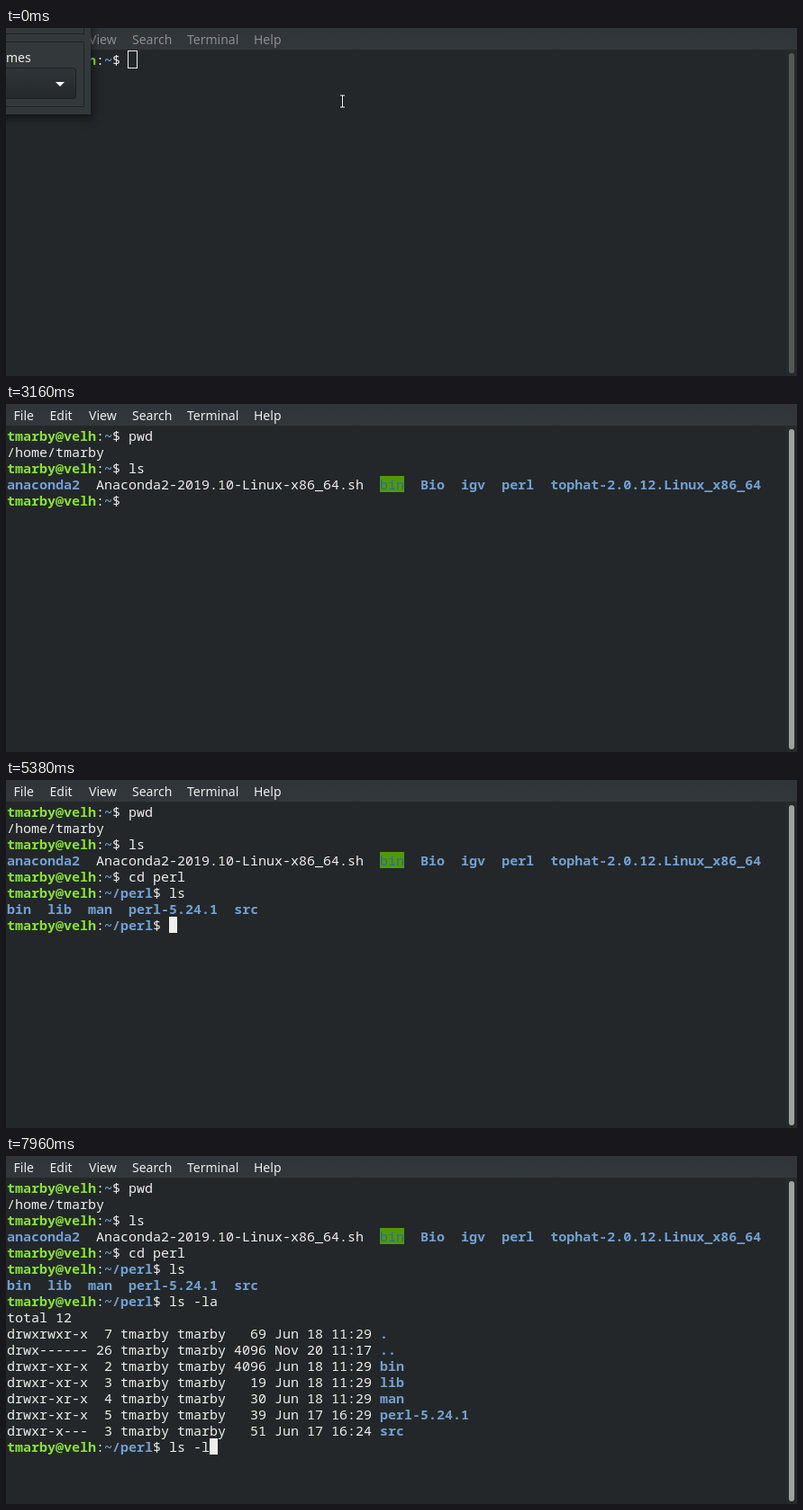
Animation of 878 by 387 pixels, one loop 8 s. Source, as an HTML page:

```html
<!DOCTYPE html>
<html lang="en">
<head>
<meta charset="utf-8">
<title>Terminal</title>
<style>
  html, body { margin: 0; width: 100%; height: 100%; overflow: hidden; background: #232729; }
  #stage { position: relative; width: 878px; height: 387px; overflow: hidden; background: #232729; }
  #stage div, #stage span.item, #stage svg { position: absolute; }
  .ui { font: 500 14px/20px "Noto Sans", "Open Sans", sans-serif; white-space: pre; }
  #menu { left: 0; top: 0; width: 878px; height: 24px; background: linear-gradient(#2f3538, #31373a); border-bottom: 1px solid #24282a; }
  #menu .item { top: 3px; }
  #trough { left: 866px; top: 25px; width: 12px; height: 362px; background: #262a2c; }
  #thumb { left: 869px; top: 28px; width: 6px; height: 356px; border-radius: 3px; }
  #screen { left: 1px; top: 26px; margin: 0; position: absolute; color: #eeeeec;
    font: 500 15px/18px "Noto Sans Mono", "Liberation Mono", monospace; font-variant-ligatures: none; white-space: pre; }
  #screen b { color: #729fcf; }
  #screen b.who { color: #8ae234; }
  #screen i { display: inline-block; height: 18px; vertical-align: top; font-style: normal; color: #3465a4; background: #4e9a06; }
  #cursor { width: 9px; height: 18px; background: #eeeeec; }
  #cursor.hollow { background: none; outline: 1px solid #eeeeec; }
  #dialog { left: -40px; top: -20px; width: 134px; height: 116px; background: #33393b; box-shadow: 0 2px 9px 2px rgba(0, 0, 0, .5); color: #eeeeec; }
  #dialog .frame { left: 0; width: 125px; border: 1px solid #1f2325; }
  #combo { left: 0; top: 64px; width: 116px; height: 33px; border: 1px solid #1c2022; border-radius: 3px; background: linear-gradient(#2f3538, #24292b); }
  #arrow { left: 95px; top: 80px; border: 5px solid transparent; border-top-color: #fff; border-bottom: 0; }
</style>
</head>
<body>
<div id="stage">
  <div id="menu" class="ui">
    <span class="item" style="left:8.5px">File</span>
    <span class="item" style="left:48.5px">Edit</span>
    <span class="item" style="left:92px">View</span>
    <span class="item" style="left:140px">Search</span>
    <span class="item" style="left:201px">Terminal</span>
    <span class="item" style="left:275px">Help</span>
  </div>
  <div id="trough"></div>
  <div id="thumb"></div>
  <pre id="screen"></pre>
  <div id="cursor"></div>
  <div id="dialog">
    <div class="frame" style="top:0;height:25px"></div>
    <div class="frame" style="top:35px;height:71px"></div>
    <span class="item ui" style="left:40px;top:43px">mes</span>
    <div id="combo"></div>
    <div id="arrow"></div>
  </div>
  <svg id="mouse" width="9" height="17" viewBox="-4.5 -8.5 9 17" fill="none">
    <path d="M-2.5-6.5H2.5M0-6.5V6.5M-2.5 6.5H2.5" stroke="#15181a" stroke-width="3"/>
    <path d="M-2.5-6.5H2.5M0-6.5V6.5M-2.5 6.5H2.5" stroke="#fff"/>
  </svg>
</div>
<script>
const LOOP = 8000, CELL_W = 9, CELL_H = 18, LEFT = 1, TOP = 26;
const USER = 'tmarby', HOST = 'velh';
const $ = id => document.getElementById(id);
const menu = $('menu'), thumb = $('thumb'), screenBox = $('screen');
const cursor = $('cursor'), dialog = $('dialog'), mouse = $('mouse');

const dir = name => `<b>${name}</b>`;
const entry = (mode, links, size, date, name) =>
  `${mode} ${links.padStart(2)} ${USER} ${USER} ${size.padStart(4)} ${date} ${dir(name)}`;

// Each command: when its prompt shows, key press times, Enter time, output
const commands = [
  { start: 0, path: '~', text: 'pwd', keys: [1580, 1660, 1720], enter: 1800,
    out: ['/home/' + USER] },
  { start: 1800, path: '~', text: 'ls', keys: [2560, 2640], enter: 2820,
    out: [[dir('anaconda2'), 'Anaconda2-2019.10-Linux-x86_64.sh', '<i>bin</i>',
      ...['Bio', 'igv', 'perl', 'tophat-2.0.12.Linux_x86_64'].map(dir)].join('  ')] },
  { start: 2820, path: '~', text: 'cd perl', keys: [3380, 3460, 3520, 3600, 3660, 3740, 3800], enter: 4100,
    out: [] },
  { start: 4120, path: '~/perl', text: 'ls', keys: [4460, 4500], enter: 4680,
    out: [['bin', 'lib', 'man', 'perl-5.24.1', 'src'].map(dir).join('  ')] },
  { start: 4680, path: '~/perl', text: 'ls -la', keys: [6020, 6120, 6200, 6280, 6360, 6420], enter: 6680,
    out: ['total 12',
      entry('drwxrwxr-x', '7', '69', 'Jun 18 11:29', '.'),
      entry('drwx------', '26', '4096', 'Nov 20 11:17', '..'),
      entry('drwxr-xr-x', '2', '4096', 'Jun 18 11:29', 'bin'),
      entry('drwxr-xr-x', '3', '19', 'Jun 18 11:29', 'lib'),
      entry('drwxr-xr-x', '4', '30', 'Jun 18 11:29', 'man'),
      entry('drwxr-xr-x', '5', '39', 'Jun 17 16:29', 'perl-5.24.1'),
      entry('drwxr-x---', '3', '51', 'Jun 17 16:24', 'src')] },
  { start: 6680, path: '~/perl', text: 'ls -l', keys: [7460, 7520, 7760, 7860, 7960], enter: LOOP, out: [] }
];
const cursorOff = [[1000, 1360], [2140, 2500], [3160, 3380], [5020, 5380], [5740, 6020], [7020, 7380]];

const clamp = x => Math.min(1, Math.max(0, x));
const mix = (a, b, k) => a + (b - a) * k;
const gray = v => `rgb(${v},${v + 2},${v + 2})`;
let shown = '';

function drawText(t) {
  const rows = [];
  let col = 0, row = 0;
  for (const c of commands) {
    if (t < c.start) break;
    const typed = c.text.slice(0, c.keys.filter(k => t >= k).length);
    row = rows.length;
    col = `${USER}@${HOST}:${c.path}$ `.length + typed.length;
    rows.push(`<b class="who">${USER}@${HOST}</b>:${dir(c.path)}$ ${typed}`);
    if (t >= c.enter) {
      rows.push(...c.out);
      row = rows.length;
      col = 0;
    }
  }
  const html = rows.join('\n');
  if (html !== shown) screenBox.innerHTML = shown = html;
  cursor.style.left = LEFT + col * CELL_W + 'px';
  cursor.style.top = TOP + row * CELL_H + 'px';
}

function draw(t) {
  drawText(t);
  cursor.className = t < 20 ? 'hollow' : '';
  cursor.style.visibility = cursorOff.some(([a, b]) => t >= a && t < b) ? 'hidden' : 'visible';

  // The window takes focus
  const focus = clamp(t / 200);
  dialog.style.display = t < 20 ? 'block' : 'none';
  menu.style.color = gray(Math.round(mix(140, 236, focus)));
  thumb.style.background = gray(Math.round(mix(86, 160, focus)));

  const k = clamp((t - 440) / 400);
  const ease = k * k * (3 - 2 * k);
  const x = Math.round(mix(373, 324, ease)), y = Math.round(mix(81, 37, ease));
  mouse.style.left = x - 4 + 'px';
  mouse.style.top = y - 8 + 'px';
  mouse.style.display = t < 1580 ? 'block' : 'none';
}

const begin = performance.now();
function tick() {
  draw((performance.now() - begin) % LOOP);
  requestAnimationFrame(tick);
}
draw(0);
requestAnimationFrame(tick);
</script>
</body>
</html>
```
